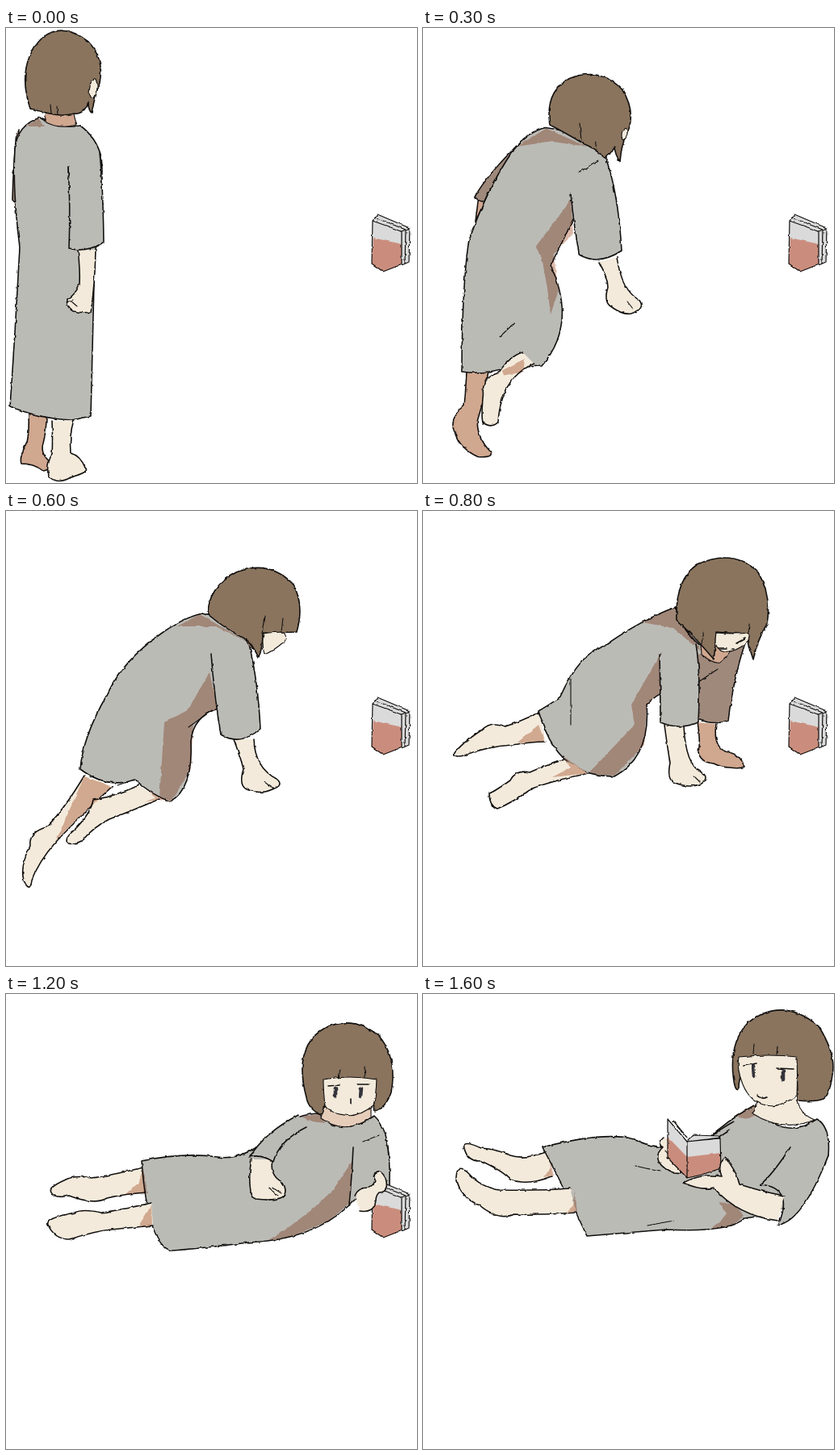
An HTML page without scripts that plays this animation: 509x564 px, repeating every 1700 ms.

```html
<!DOCTYPE html>
<html lang="en">
<head>
<meta charset="utf-8">
<title>Lying down with a book</title>
<style>
html, body { margin: 0; height: 100%; overflow: hidden; background: #fff }
svg { display: block; width: 100vw; height: 100vh }

/* Poses are joined by stepped tweens, so the picture changes every 100 ms. */
path {
  animation: 1.7s infinite;
  animation-timing-function: steps(2), step-end;
  stroke: #12100f; stroke-width: 1.6; stroke-linejoin: round; stroke-linecap: round;
  fill: none;
}
.dress { fill: #bbbbb6 }
.skin { fill: #f3eadb }
.dim { fill: #9f897b }
.tan { fill: #d0a78f }
.hair { fill: #8a745e }
.paper { fill: #dadada; stroke-width: 1.2 }
.tint { stroke: none; mix-blend-mode: multiply }
.fine { stroke-width: 1.1 }
.iris { stroke: #34343b; stroke-width: 4.5 }

@keyframes early { 0% { opacity: 1 } 35.29%, 100% { opacity: 0 } }
@keyframes late { 0% { opacity: 0 } 41.17%, 100% { opacity: 1 } }
@keyframes awake { 0% { opacity: 0 } 58.82%, 100% { opacity: 1 } }

@keyframes torso {
  0% { d: path("M42 111Q62 126 92 121Q112 136 118 160Q122 190 110 275Q107 380 105 481Q92 484 81 486Q40 484 5 469Q10 400 17 272Q8 200 11 150Q14 120 42 111Z") }
  11.76% { d: path("M118 116Q150 125 190 141Q198 165 175 190Q150 250 135 305Q168 370 122 438Q108 428 95 424Q60 452 34 441Q35 330 45 260Q65 190 80 148Q95 122 118 116Z") }
  23.52% { d: path("M185 131Q235 132 262 160Q268 185 222 230Q205 262 181 283Q215 365 172 400Q150 412 112 418Q90 408 62 411Q62 310 68 270Q90 215 140 160Q165 135 185 131Z") }
  35.29% { d: path("M243 127Q275 135 302 165Q300 200 262 245Q232 255 229 285Q232 345 203 360Q180 352 160 333Q125 345 92 320Q95 280 125 228Q145 185 192 152Q220 132 243 127Z") }
  47.05% { d: path("M313 119Q320 150 350 172Q360 190 345 215Q300 215 277 240Q282 305 237 329Q205 328 188 317Q158 300 143 248Q165 235 170 230Q195 175 225 167Q270 135 313 119Z"); animation-timing-function: steps(4) }
  70.58% { d: path("M385 148Q420 178 456 151Q472 165 474 200Q435 240 425 262Q380 305 300 308Q235 316 205 318Q176 312 168 207Q220 196 262 202Q290 207 325 180Q350 150 385 148Z"); animation-timing-function: steps(4) }
  94.11%, 100% { d: path("M410 138Q445 184 488 155Q505 165 502 200Q475 270 398 278Q380 296 300 292Q250 296 203 300Q185 260 148 190Q225 170 262 180Q300 200 350 182Q375 158 410 138Z") }
}
@keyframes shade {
  0% { d: path("M15 128L40 112 48 122 25 122ZM78 270L78 270 78 270 78 270 78 270 78 270 78 270 78 270ZM30 485L30 485 30 485 30 485ZM70 487L70 487 70 487 70 487Z") }
  11.76% { d: path("M85 136L120 118 148 131 110 134ZM146 205L148 270 142 278 139 300 138 312 128 300 122 275 134 265ZM50 445L50 445 50 445 50 445ZM78 433L95 425 92 445 70 446Z") }
  23.52% { d: path("M148 158L185 131 258 163 205 147ZM220 222L224 240 181 283 197 350 178 398 180 345 172 295 145 277ZM70 412L70 412 70 412 70 412ZM118 416L157 395 157 408 130 415Z") }
  35.29% { d: path("M212 143L240 128 300 163 260 143ZM252 200L262 245 232 262 229 320 205 359 190 356 196 262 225 247ZM97 329L132 342 85 385 62 408ZM175 345L198 358 172 360 185 356Z") }
  47.05% { d: path("M272 138L313 118 345 175 310 145ZM295 175L295 225 277 240 274 290 237 328 205 325 262 265 258 240ZM143 265L151 286 117 287 117 287ZM175 305L205 325 160 330 182 318Z"); animation-timing-function: steps(4) }
  70.58% { d: path("M365 152L388 149 395 160 380 158ZM430 205L427 258 400 281 350 302 325 305 345 293 378 268 405 243ZM170 217L176 247 148 248 163 235ZM180 262L181 287 163 289 172 275Z"); animation-timing-function: steps(4) }
  94.11%, 100% { d: path("M386 152L410 138 428 142 402 155ZM385 260L398 275 385 285 370 290 354 292 368 282 376 272 366 258ZM155 197L162 225 150 227 158 215ZM188 243L191 270 177 271 186 262Z") }
}
@keyframes farLeg {
  0% { fill: #d0a78f; d: path("M28 478Q29 500 26 514Q16 532 19 540Q35 540 46 549Q60 546 55 538Q42 528 46 515Q50 500 50 482") }
  11.76% { fill: #d0a78f; d: path("M44 445Q42 470 42 485Q26 500 32 512Q50 535 68 543Q80 544 76 535Q62 510 62 495Q68 460 74 438") }
  23.52% { fill: #d0a78f; d: path("M64 408Q63 440 60 450Q36 468 47 492Q42 508 68 520Q98 522 90 514Q70 502 73 478Q88 445 88 410") }
  35.29% { fill: #f3eadb; d: path("M97 328Q72 370 50 392Q28 398 30 415Q15 445 24 462Q30 472 32 458Q40 435 62 410Q95 375 132 341") }
  47.05% { fill: #f3eadb; d: path("M143 250Q118 262 102 267Q85 259 72 272Q48 288 39 300Q38 306 50 303Q80 292 110 290Q135 286 152 286"); animation-timing-function: steps(4) }
  70.58% { fill: #f3eadb; d: path("M170 215Q125 226 105 228Q85 224 72 231Q52 240 56 246Q60 254 78 250Q110 262 125 253Q150 247 178 246"); animation-timing-function: steps(4) }
  94.11%, 100% { fill: #f3eadb; d: path("M155 195Q125 206 108 200Q90 192 72 191Q48 180 51 191Q55 208 72 207Q100 220 108 230Q130 238 160 226") }
}
@keyframes nearLeg {
  0% { d: path("M57 487Q58 515 57 528Q48 545 54 557Q65 566 80 557Q105 550 98 545Q92 530 80 527Q78 505 84 486") }
  11.76% { d: path("M95 426Q85 455 81 473Q62 482 65 500Q62 530 70 535Q88 538 84 525Q80 505 92 490Q105 450 118 437") }
  23.52% { d: path("M152 378Q130 358 106 382Q82 385 84 408Q82 430 78 443Q82 456 102 452Q108 440 106 425Q112 408 157 395") }
  35.29% { d: path("M165 340Q130 355 108 358Q105 375 84 396Q70 408 78 412Q85 414 95 408Q108 392 128 382Q155 372 190 357") }
  47.05% { d: path("M175 308Q145 318 132 324Q115 320 108 334Q88 348 82 350Q82 365 92 369Q110 362 135 344Q165 333 205 325"); animation-timing-function: steps(4) }
  70.58% { d: path("M180 259Q140 268 118 271Q95 266 85 271Q48 278 52 286Q60 304 78 304Q115 293 130 292Q160 289 182 287"); animation-timing-function: steps(4) }
  94.11%, 100% { d: path("M182 241Q145 244 95 243Q72 240 56 222Q42 208 41 228Q46 252 70 262Q95 282 112 273Q150 274 190 271") }
}
@keyframes backSleeve {
  0% { d: path("M13 130Q9 170 8 212Q10 216 14 214Q12 170 16 125") }
  11.76% { d: path("M84 134Q52 185 46 212Q50 217 54 214Q66 180 86 136") }
  23.52% { d: path("M168 138Q105 180 82 207Q90 214 98 216Q110 195 150 152") }
  35.29%, 100% { d: path("M215 150Q190 180 180 200Q185 210 195 215Q210 190 220 160") }
}
@keyframes backHand {
  0% { d: path("M14 215L16 250 20 250 18 215") }
  11.76% { d: path("M47 214L45 255 52 235 54 215") }
  23.52% { d: path("M90 211L84 232 80 240 98 218") }
  35.29%, 100% { d: path("M180 210L175 220 180 225 190 215") }
}
@keyframes nearArm {
  0% { d: path("M89 275Q92 300 91 318Q85 332 76 336Q74 346 83 351Q95 354 105 352Q110 320 111 275") }
  11.76% { d: path("M170 279Q178 300 178 315Q172 330 178 340Q190 357 204 356Q222 348 214 338Q192 320 192 277") }
  23.52% { d: path("M266 301Q280 320 280 328Q276 345 284 348Q305 356 312 352Q330 348 322 337Q300 330 288 292") }
  35.29% { d: path("M282 283Q292 310 294 320Q288 340 298 345Q315 352 330 345Q345 340 335 332Q308 318 307 283") }
  47.05% { d: path("M299 265Q303 295 306 312Q302 332 310 336Q330 345 345 338Q355 330 345 324Q325 315 323 266"); animation-timing-function: steps(4) }
  70.58% { d: path("M304 205Q300 225 303 245Q302 252 310 254Q330 257 342 252Q350 245 342 233Q326 225 330 205"); animation-timing-function: steps(4) }
  94.11%, 100% { d: path("M298 178Q290 185 297 190Q288 198 292 208Q298 218 312 222Q325 225 320 205Q305 190 305 180") }
}
@keyframes nearSleeve {
  0% { d: path("M77 172Q80 220 78 273Q98 279 121 266Q120 190 116 155") }
  11.76% { d: path("M147 190Q146 230 149 272Q172 284 200 268Q202 200 192 152") }
  23.52% { d: path("M219 222Q228 260 238 290Q262 306 292 284Q282 215 264 180") }
  35.29% { d: path("M254 177Q258 230 266 277Q290 292 315 270Q312 210 301 165") }
  47.05% { d: path("M293 178Q294 220 294 262Q318 272 341 262Q344 200 338 165"); animation-timing-function: steps(4) }
  70.58% { d: path("M362 150Q320 172 302 202Q316 198 331 208Q338 182 372 165"); animation-timing-function: steps(4) }
  94.11%, 100% { d: path("M385 158Q360 172 352 182Q354 186 360 184Q366 176 380 168") }
}
@keyframes leftSleeve {
  35.29% { fill: #9f897b; d: path("M270 200Q258 240 250 250Q260 257 266 259Q290 240 290 200") }
  47.05% { fill: #9f897b; d: path("M339 178Q338 230 340 258Q360 266 378 260Q385 205 398 167"); animation-timing-function: steps(4) }
  70.58% { fill: #bbbbb6; d: path("M430 190Q428 230 425 262Q450 235 475 238Q476 205 471 180"); animation-timing-function: steps(4) }
  94.11%, 100% { fill: #bbbbb6; d: path("M455 190Q432 225 418 236Q460 240 440 286Q470 282 502 200") }
}
@keyframes leftArm {
  35.29% { fill: #d0a78f; d: path("M280 230Q278 245 280 250Q282 258 286 260Q290 262 294 262Q300 262 302 258Q300 250 298 248Q296 240 296 230") }
  47.05% { fill: #d0a78f; d: path("M340 262Q344 285 341 300Q345 312 360 313Q370 318 380 318Q392 320 398 317Q394 303 382 300Q358 297 363 264"); animation-timing-function: steps(4) }
  70.58% { fill: #f3eadb; d: path("M432 250Q436 240 448 240Q460 236 456 224Q462 214 470 228Q475 246 462 246Q458 250 458 256Q456 272 438 269"); animation-timing-function: steps(4) }
  94.11%, 100% { fill: #f3eadb; d: path("M447 250Q420 245 392 236Q388 218 374 203Q364 212 370 226Q345 222 322 234Q345 244 360 240Q390 275 440 281") }
}
@keyframes neck {
  0% { fill: #d0a78f; d: path("M50 104Q48 112 48 116Q65 126 88 120Q84 110 84 104") }
  11.76% { d: path("M135 110Q140 118 145 122Q155 125 170 125Q170 118 170 110") }
  23.52% { d: path("M225 120Q230 130 235 135Q245 140 250 140Q250 130 250 120") }
  35.29% { d: path("M290 140Q296 160 300 165Q306 172 312 175Q316 160 316 150") }
  47.05% { fill: #d0a78f; d: path("M340 150Q345 168 345 178Q360 190 368 188Q385 175 385 160"); animation-timing-function: steps(4) }
  70.58% { fill: #e6cdba; d: path("M392 140Q392 150 390 154Q420 176 452 153Q452 145 452 140"); animation-timing-function: steps(4) }
  94.11%, 100% { fill: #f3eadb; d: path("M414 125Q414 142 408 148Q445 172 485 156Q465 148 464 130") }
}
@keyframes hair {
  0% { d: path("M30 100Q12 45 45 12Q70 -8 102 17Q122 38 116 68Q110 85 106 105Q102 102 102 92Q96 108 84 106Q70 110 54 106Q40 103 30 100Z") }
  11.76% { d: path("M120 112Q106 62 138 40Q172 20 203 48Q222 72 214 100Q206 120 204 138Q198 130 200 122Q190 138 182 140Q162 132 148 130Q128 120 120 112Z") }
  23.52% { d: path("M194 128Q196 95 225 85Q265 76 290 104Q303 130 296 150Q286 160 284 193Q278 185 274 172Q272 180 268 182Q262 165 250 157Q225 140 194 128Z") }
  35.29% { d: path("M250 128Q250 95 285 76Q325 60 355 90Q370 115 360 150Q342 150 328 152Q320 150 318 152Q318 168 313 182Q305 165 298 160Q270 145 250 128Z") }
  47.05% { d: path("M314 135Q312 85 340 66Q385 46 415 76Q432 105 426 140Q414 160 409 184Q402 165 403 152Q385 152 363 150Q362 170 360 184Q345 165 314 135Z"); animation-timing-function: steps(4) }
  70.58% { d: path("M372 128Q355 65 395 42Q430 26 462 52Q485 80 477 122Q470 142 456 145Q455 140 456 135Q425 150 395 135Q393 150 390 150Q374 142 372 128Z"); animation-timing-function: steps(4) }
  94.11%, 100% { d: path("M384 100Q380 60 402 36Q445 2 490 40Q512 75 507 100Q504 125 496 130Q485 134 464 132Q464 110 462 82Q390 72 391 118Q386 122 384 100Z") }
}
@keyframes face {
  0% { d: path("M104 70Q110 58 112 66Q114 72 112 80Q110 88 106 87Q102 85 102 80Q102 75 104 70Z") }
  11.76% { d: path("M205 104Q210 94 212 100Q214 108 210 116Q206 120 204 119Q202 114 203 110Q203 106 205 104Z") }
  23.52% { d: path("M289 152Q292 150 293 152Q294 156 292 157Q291 158 290 158Q289 157 289 156Q288 154 289 152Z") }
  35.29% { d: path("M319 152Q330 150 344 150Q350 160 342 164Q330 174 320 178Q318 170 318 162Q318 156 319 152Z") }
  47.05% { d: path("M363 151Q385 153 404 151Q405 160 400 164Q385 176 374 174Q364 172 362 164Q362 156 363 151Z"); animation-timing-function: steps(4) }
  70.58% { d: path("M393 106Q425 100 459 106Q458 128 455 138Q435 154 420 150Q400 148 395 138Q393 120 393 106Z"); animation-timing-function: steps(4) }
  94.11%, 100% { d: path("M391 78Q430 74 463 78Q464 105 463 126Q440 142 425 138Q405 134 396 112Q388 92 391 78Z") }
}
/* Two lash lines, then the nose or mouth. */
@keyframes lashes {
  35.29% { d: path("M326 165L332 165M338 162L343 159M335 168Q336 168 337 168") }
  47.05% { d: path("M366 170L376 170M388 164L399 158M383 171Q384 171 385 171"); animation-timing-function: steps(4) }
  70.58% { d: path("M399 114L413 113M434 112L449 112M427 130Q427 133 427 136"); animation-timing-function: steps(4) }
  94.11%, 100% { d: path("M397 89L413 86M438 92L459 93M414 126Q419 131 426 128") }
}
@keyframes iris {
  47.05% { d: path("M376 155L376 165M396 155L396 165"); animation-timing-function: steps(4) }
  70.58% { d: path("M408 117L408 127M440 117L439 127"); animation-timing-function: steps(4) }
  94.11%, 100% { d: path("M409 89L410 102M446 95L446 106") }
}
/* Two cloth creases, two hair strands, a finger. */
@keyframes creases {
  0% { d: path("M77 172L77 184M75 340L83 337M55 95L56 106M63 97L64 107M80 338L88 345") }
  11.76% { d: path("M158 162L180 153M82 414L96 399M151 110L149 128M155 122L156 130M198 336L202 350") }
  23.52% { d: path("M228 196L254 177M110 350L129 333M237 126L243 150M272 160L274 172M308 342L318 346") }
  35.29% { d: path("M226 268L255 247M138 340L158 333M321 130L318 152M343 133L341 150M320 336L330 343") }
  47.05% { d: path("M183 208L183 265M341 212L365 196M348 150L344 168M404 140L403 152M335 328L343 336"); animation-timing-function: steps(4) }
  70.58% { d: path("M442 183L462 175M330 240L341 247M414 94L412 104M444 90L445 103M326 240L336 250"); animation-timing-function: steps(4) }
  94.11%, 100% { d: path("M263 213L293 220M278 287L310 281M410 62L409 74M439 66L438 75M300 195L308 205") }
}
@keyframes book {
  0%, 70.58% { d: path("M490 252L500 248 499 290 490 294ZM460 231L500 248 490 252 454 239ZM454 239L490 252 490 293 467 302 453 292ZM495 250L494 292M457 235L495 250"); animation-timing-function: steps(4) }
  94.11%, 100% { d: path("M327 183L303 155 303 203 327 228ZM335 175L366 176 368 179 327 183ZM327 183L368 178 369 216 345 224 327 228ZM327 183L327 228M310 157L327 178") }
}
@keyframes cover {
  0%, 70.58% { d: path("M455 260L490 268 490 293 467 302 453 292ZM490 294L499 290 499 290 490 294Z"); animation-timing-function: steps(4) }
  94.11%, 100% { d: path("M327 202L369 197 369 216 345 224 327 228ZM327 202L303 177 303 203 327 228Z") }
}
</style>
</head>
<body>
<svg viewBox="0 0 509 564">
  <filter id="rough" x="0" y="0" width="509" height="564" filterUnits="userSpaceOnUse" color-interpolation-filters="sRGB">
    <feTurbulence type="fractalNoise" baseFrequency=".13" numOctaves="2" seed="4"/>
    <feDisplacementMap in="SourceGraphic" scale="3" xChannelSelector="R" yChannelSelector="G"/>
  </filter>
  <g filter="url(#rough)">
    <path class="tan" style="animation-name: backHand, early"/>
    <path class="dim" style="animation-name: backSleeve, early"/>
    <path style="animation-name: farLeg"/>
    <path class="dress" style="animation-name: torso"/>
    <path class="skin" style="animation-name: nearLeg"/>
    <path class="tint" style="animation-name: shade; fill: #dcb8a8"/>
    <path style="animation-name: leftSleeve, late"/>
    <path class="skin" style="animation-name: nearArm"/>
    <path class="dress" style="animation-name: nearSleeve"/>
    <path class="fine" style="animation-name: neck"/>
    <path class="hair" style="animation-name: hair"/>
    <path class="skin fine" style="animation-name: face"/>
    <path style="animation-name: lashes, late"/>
    <path class="iris" style="animation-name: iris, awake"/>
    <path class="fine" style="animation-name: creases"/>
    <path class="paper" style="animation-name: book"/>
    <path class="tint" style="animation-name: cover; fill: #eda592"/>
    <path style="animation-name: leftArm, late"/>
  </g>
</svg>
</body>
</html>
```
